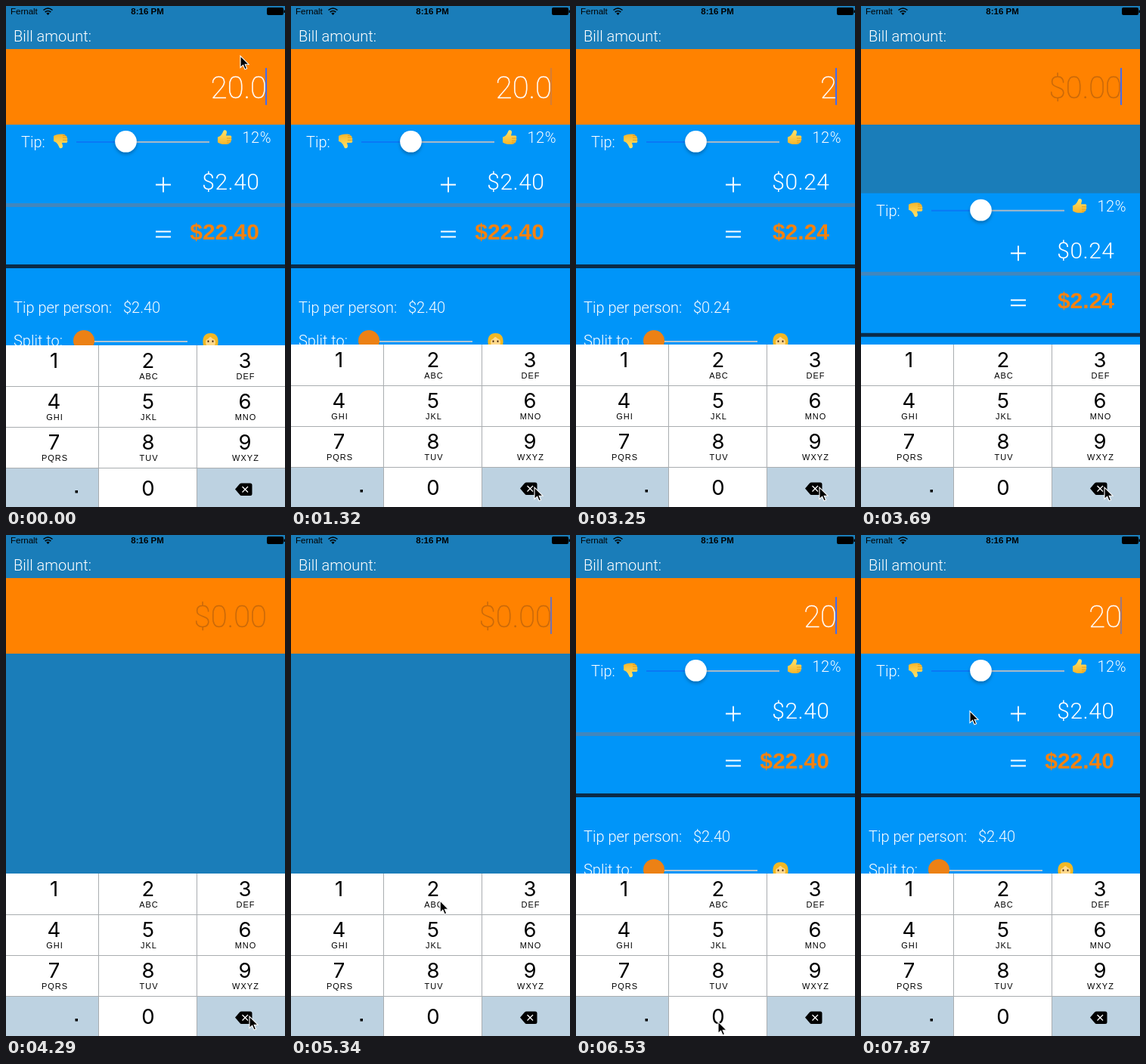
Write an HTML page that moves like this. It is 369 px wide and 663 px high and loops after 8000 ms.

```html
<!DOCTYPE html>
<html lang="en">
<head>
<meta charset="utf-8">
<title>Tip calculator</title>
<style>
  html, body { margin: 0; width: 100%; height: 100%; overflow: hidden; background: #1a7db9; }
  svg { display: block; width: 369px; height: 663px; }
  text { font-family: "Liberation Sans", Arial, sans-serif; }
  .light { font: 300 20px Roboto, sans-serif; fill: #fff; }
  .sum { font-size: 30px; }
  .spaced { letter-spacing: .5px; }
  .bill { font: 200 40px Roboto, sans-serif; fill: currentColor; stroke: currentColor; stroke-width: .5px; }
  .end { text-anchor: end; }
  .digit { font: 400 27.5px Inter, sans-serif; text-anchor: middle; }
  .letters { font-size: 11px; letter-spacing: 1px; text-anchor: middle; }
</style>
</head>
<body>
<svg viewBox="0 0 369 663">
  <defs>
    <filter id="shadow" x="-50%" y="-50%" width="200%" height="200%">
      <feDropShadow dx="0" dy="2.5" stdDeviation="2" flood-opacity=".3"/>
    </filter>
    <linearGradient id="skin" x2="0" y2="1">
      <stop stop-color="#ffe36b"/><stop offset="1" stop-color="#f7b52b"/>
    </linearGradient>
    <g id="thumb">
      <path d="M-9 0Q-5 -1 -3 -5L-1 -9Q3 -10 3 -6L2 -2H8Q10 -1 9 1.500Q10 3.500 8.500 5Q9 7 7 7.500Q6 9.500 3 9.500Q-5 10 -9 7Z" fill="url(#skin)"/>
      <path d="M3 1.500H8.700M3 4.800H8.300M3 7.500H7" stroke="#d9921c" stroke-width=".8"/>
    </g>
  </defs>
  <rect width="369" height="663" fill="#1a7db9"/>

  <g id="panel">
    <rect y="157" width="369" height="510" fill="#0095f9"/>
    <rect y="261" width="369" height="5" fill="#4287bd"/>
    <rect y="342" width="369" height="5" fill="#0b2b48"/>
    <text class="light" x="20" y="187">Tip:</text>
    <use href="#thumb" transform="translate(72 179) scale(1 -1)"/>
    <use href="#thumb" transform="translate(289 173.500)"/>
    <path d="M93 180H158" stroke="#0a78f5" stroke-width="2"/>
    <path d="M158 180H269" stroke="#a9b9c6" stroke-width="2"/>
    <circle cx="158.500" cy="179.300" r="14.300" fill="#fff" filter="url(#shadow)"/>
    <text class="light spaced end" x="351" y="181">12%</text>
    <path d="M198 236.500H218M208 226.500V246.500M198 298.500H218M198 305.500H218" stroke="#fff" stroke-width="1.800"/>
    <text class="light sum spaced end" id="tip" x="335.500" y="243"></text>
    <text class="sum end" id="total" x="335" y="309" font-weight="bold" fill="#f5820f"></text>
    <text class="light" x="10" y="406">Tip per person:</text>
    <text class="light" id="share" x="155" y="406"></text>
    <text class="light" x="10" y="450">Split to:</text>
    <path d="M90 444H240" stroke="#b5c5d0" stroke-width="2"/>
    <circle cx="103" cy="443" r="14" fill="#ec8115"/>
    <path d="M261 450Q258 433 270.500 433Q283 433 280 450Z" fill="#f2b824"/>
    <ellipse cx="270.500" cy="445" rx="6.500" ry="7" fill="#ffd98c"/>
    <path d="M264 442Q268 441 270 437Q273 441 277 442V437H264Z" fill="#f2b824"/>
    <path d="M267.500 442.500v2.500M273.500 442.500v2.500" stroke="#4a2b12" stroke-width="1.800"/>
  </g>

  <rect y="57" width="369" height="100" fill="#ff8200"/>
  <text class="light" x="10" y="47">Bill amount:</text>
  <text class="bill end" id="bill" x="345" y="122"></text>
  <rect id="caret" x="343" y="82" width="2" height="49" fill="#426bf2"/>

  <g id="status">
    <text x="6" y="11" font-size="11.500">Fernalt</text>
    <path d="M49.500 5.500Q55.500 .500 61.500 5.500M51.700 8Q55.500 5 59.300 8" fill="none" stroke="#000" stroke-width="1.600"/>
    <path d="M53.300 9.700Q55.500 8 57.700 9.700L55.500 12Z"/>
    <text x="187" y="11" font-size="11.500" font-weight="bold" text-anchor="middle">8:16 PM</text>
    <rect x="345" y="2" width="22" height="10" rx="2"/>
    <rect x="367.500" y="5.500" width="1.500" height="3.500"/>
  </g>

  <g id="pad"></g>
  <path id="cursor" d="M0 0V15.500L3.600 12.200L6 17.800L8.600 16.700L6.200 11.200H11Z" stroke="#fff" stroke-width="1.100"/>
</svg>
<script>
const LOOP = 8000, FRAMES = 54, FRAME = LOOP / FRAMES;
const TAP = 140, SLIDE = 400, DROP = 291;
const GREY = "#bdd2e1", WHITE = "#fff";
const $ = id => document.getElementById(id);
const clamp = v => Math.min(1, Math.max(0, v));
const smooth = k => k * k * (3 - 2 * k);
const easeOut = k => 1 - (1 - k) ** 2;
const money = n => "$" + n.toFixed(2);

// Four deletes at a steady pace, then two digits.
const taps = [0, 1, 2, 3].map(i => ({ time: 2205 + 450 * i, key: "del" }));
taps.push({ time: 5625, key: "2" }, { time: 6110, key: "0" });
const hideTime = taps[3].time, showTime = taps[5].time;

const moves = [
  { from: 0, to: 1170, x: 322, y: 637 },
  { from: 4890, to: 5480, x: 189, y: 474 },
  { from: 5640, to: 6060, x: 188, y: 644 },
  { from: 6530, to: 7400, x: 187, y: 236 },
  { from: 7560, to: 7850, x: 144, y: 233 }
];

const keys = {};

function buildPad() {
  const edges = [0, 122.5, 252.5, 369], mid = [63.5, 188, 316];
  const names = [..."123456789.0", "del"];
  const letters = ["", "ABC", "DEF", "GHI", "JKL", "MNO", "PQRS", "TUV", "WXYZ"];
  let out = "";
  names.forEach((name, i) => {
    const col = i % 3, y = 448 + 54 * Math.floor(i / 3), x = edges[col];
    const isDigit = name >= "0" && name <= "9";
    out += `<rect id="key-${name}" x="${x}" y="${y}" width="${edges[col + 1] - x}" height="55" fill="${isDigit ? WHITE : GREY}"/>`;
    if (isDigit) out += `<text class="digit" x="${mid[col]}" y="${y + (name === "0" ? 37 : 30)}">${name}</text>`;
    if (letters[i]) out += `<text class="letters" x="${mid[col] + 1}" y="${y + 45}">${letters[i]}</text>`;
  });
  out += `<path d="M0 502.500H369M0 556.500H369M0 610.500H369M122.500 448V663M252.500 448V663" stroke="#a9adb0"/>
    <rect x="91.500" y="640" width="3.500" height="3.500"/>
    <path d="M303 638.500L309 631.500Q310 630.500 311.500 630.500H323Q325.500 630.500 325.500 633V644.500Q325.500 647 323 647H311.500Q310 647 309 645.500Z"/>
    <path d="M312.500 635L320 642.500M320 635L312.500 642.500" stroke="#fff" stroke-width="1.300"/>`;
  $("pad").innerHTML = out;
  for (const name of names) {
    const el = $("key-" + name), fill = el.getAttribute("fill");
    keys[name] = { el, fill, lit: fill === WHITE ? GREY : WHITE };
  }
}

function pointer(t) {
  let x = 310, y = 66;
  for (const m of moves) {
    const k = easeOut(clamp((t - m.from) / (m.to - m.from)));
    x += (m.x - x) * k;
    y += (m.y - y) * k;
  }
  return [x, y];
}

function entry(t) {
  let text = "20.0", amount = 20, last = 0, down = "";
  for (const { time, key } of taps) {
    if (t < time) break;
    text = key === "del" ? text.slice(0, -1) : text + key;
    if (text) amount = parseFloat(text);
    last = time;
    down = t - time < TAP ? key : "";
  }
  return { text, amount, down, idle: t - last };
}

const blink = idle => idle < 500 ? 1 : clamp(.5 + Math.cos(2 * Math.PI * (idle - 167) / 900));
const slide = (t, start) => smooth(clamp((t - start) / SLIDE));
const move = (id, x, y) => $(id).setAttribute("transform", `translate(${x} ${y})`);

function draw(t) {
  const { text, amount, down, idle } = entry(t);
  move("cursor", ...pointer(t));
  move("panel", 0, DROP * (slide(t, hideTime) - slide(t, showTime)));
  move("pad", 0, 1 - clamp(t / FRAME));
  $("caret").setAttribute("opacity", blink(idle));
  $("bill").textContent = text || "$0.00";
  $("bill").style.color = text ? "#fff" : "#c8690a";
  $("tip").textContent = $("share").textContent = money(amount * .12);
  $("total").textContent = money(amount * 1.12);
  for (const name in keys) {
    const { el, fill, lit } = keys[name];
    el.setAttribute("fill", name === down ? lit : fill);
  }
}

buildPad();
const start = performance.now();
function tick() {
  const t = (performance.now() - start) % LOOP;
  // The screen updates at a low, steady rate.
  draw(Math.min(FRAMES - 1, Math.floor((t + 20) / FRAME)) * FRAME);
  requestAnimationFrame(tick);
}
tick();
</script>
</body>
</html>
```
